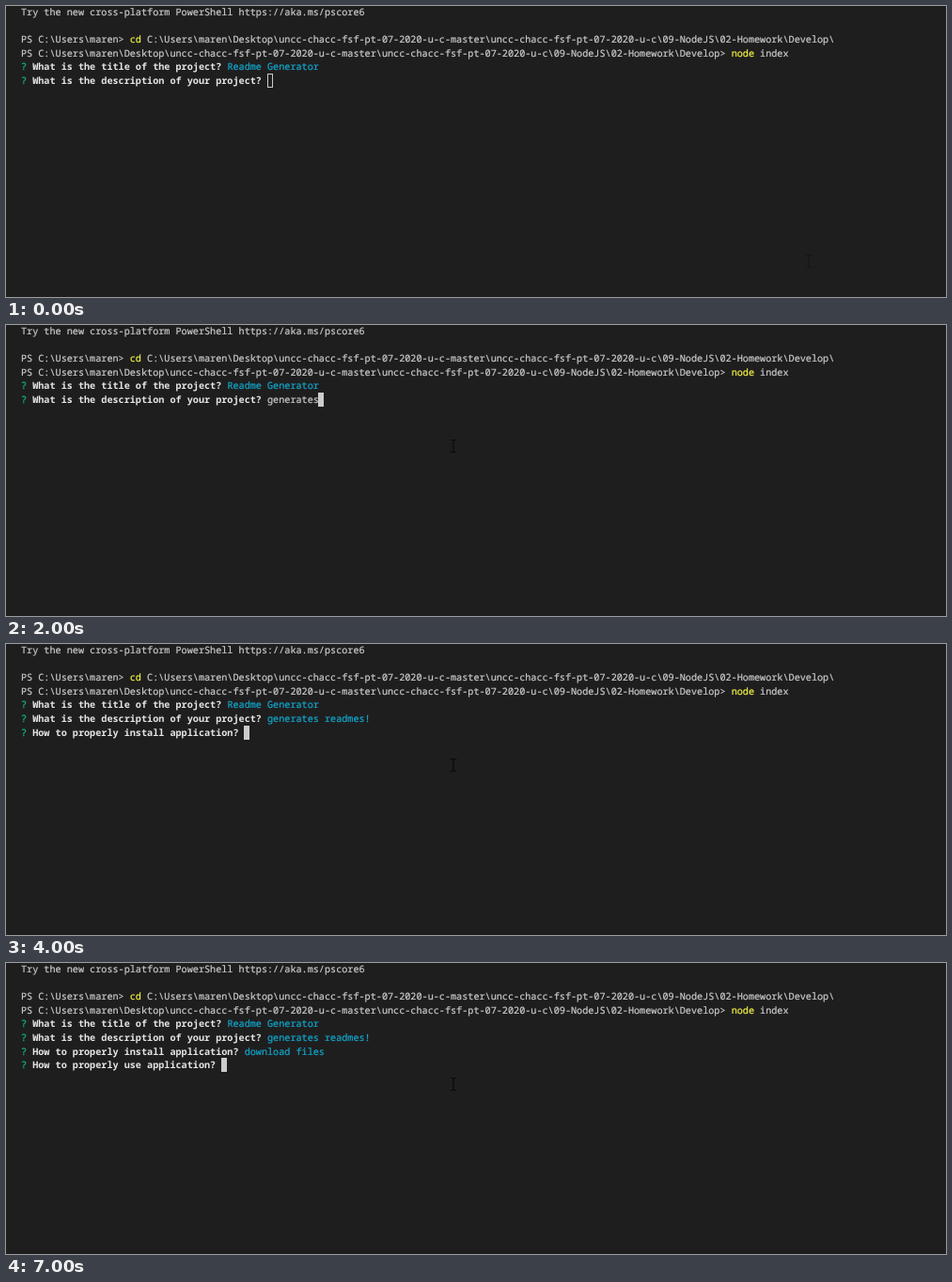
Animation, 1000 px wide and 310 px high, one loop 7100 ms. Source, as an HTML page:

```html
<!DOCTYPE html>
<html lang="en">
<head>
<meta charset="utf-8">
<title>Readme generator in a terminal</title>
<style>
  html, body { margin: 0; width: 100%; height: 100%; overflow: hidden; background: #1f1e1f; }
  svg { display: block; width: 1000px; height: 310px; }
  text {
    font: 10.16px "Noto Sans Mono", "DejaVu Sans Mono", monospace;
    color: #ccc; fill: currentColor; stroke: currentColor; stroke-width: 0.2px;
    white-space: pre; text-rendering: geometricPrecision;
  }
  tspan { fill: currentColor; stroke: currentColor; }
  .cmd { color: #f5f543; }
  .mark { color: #0dbc79; }
  .ask { color: #e5e5e5; font-weight: bold; stroke: none; }
  .done { color: #11a8cd; }
</style>
</head>
<body>
<svg id="stage" viewBox="0 0 1000 310" xmlns="http://www.w3.org/2000/svg">
  <rect width="1000" height="310" fill="#1f1e1f"/>
  <text x="16" y="10">Try the new cross-platform PowerShell https://aka.ms/pscore6</text>
  <text x="16" y="39">PS C:\Users\maren> <tspan class="cmd">cd</tspan> C:\Users\maren\Desktop\uncc-chacc-fsf-pt-07-2020-u-c-master\uncc-chacc-fsf-pt-07-2020-u-c\09-NodeJS\02-Homework\Develop\</text>
  <text x="16" y="54">PS C:\Users\maren\Desktop\uncc-chacc-fsf-pt-07-2020-u-c-master\uncc-chacc-fsf-pt-07-2020-u-c\09-NodeJS\02-Homework\Develop> <tspan class="cmd">node</tspan> index</text>
  <g id="prompts"></g>
  <rect id="caret" width="5" height="14" stroke="#ccc"/>
  <path id="mouse" d="M-3.5-6.5H-1L0-5.5L1-6.5H3.5M0-5.5V5.5M-3.5 6.5H-1L0 5.5L1 6.5H3.5" fill="none" stroke="#0a0a0a" stroke-width="1.1"/>
</svg>
<script>
const LOOP = 7100, STEP = 100;
const LEFT = 16, CELL = 6.096, ROW = 14.65, BASE = 9.6;
const FOCUS = 1100;

// show: prompt appears, enter: answer submitted, keys: [time, characters typed]
const prompts = [
  { ask: "What is the title of the project?", answer: "Readme Generator",
    show: -1, enter: -1, keys: [[-1, 16]] },
  { ask: "What is the description of your project?", answer: "generates readmes!",
    show: -1, enter: 3600,
    keys: [[1400, 0], [1500, 2], [1600, 4], [1900, 7], [2000, 9], [2200, 10], [2500, 13], [2900, 17], [3200, 17], [3300, 18]] },
  { ask: "How to properly install application?", answer: "download files",
    show: 3600, enter: 6400, keys: [[5400, 0], [6000, 13], [6200, 14]] },
  { ask: "How to properly use application?", answer: "",
    show: 6400, enter: LOOP, keys: [[0, 0]] }
];

const mouseX = [[0, 854], [200, 585], [300, 475], [400, 371], [500, 289], [600, 300], [800, 440], [900, 476]];
const mouseY = [[0, 272], [200, 190], [300, 163], [400, 122], [500, 100], [600, 102], [800, 124], [900, 129]];

const $ = id => document.getElementById(id);
const baseline = row => Math.round(BASE + ROW * row);

function along(points, t) {
  if (t <= points[0][0]) return points[0][1];
  for (let i = 1; i < points.length; i++) {
    const [t0, v0] = points[i - 1], [t1, v1] = points[i];
    if (t <= t1) return v0 + (v1 - v0) * (t - t0) / (t1 - t0);
  }
  return points[points.length - 1][1];
}

function add(parent, tag, cls, text) {
  const el = document.createElementNS("http://www.w3.org/2000/svg", tag);
  if (cls) el.setAttribute("class", cls);
  if (text) el.textContent = text;
  return parent.appendChild(el);
}

function set(el, attrs) {
  for (const name in attrs) el.setAttribute(name, attrs[name]);
}

prompts.forEach((p, i) => {
  p.y = baseline(4 + i);
  p.line = add($("prompts"), "text");
  set(p.line, { x: LEFT, y: p.y });
  add(p.line, "tspan", "mark", "? ");
  add(p.line, "tspan", "ask", p.ask + " ");
  p.input = add(p.line, "tspan");
});

function draw(t) {
  for (const p of prompts) {
    const count = Math.floor(along(p.keys, t) + 1e-6);
    p.line.setAttribute("visibility", t >= p.show ? "visible" : "hidden");
    p.input.textContent = p.answer.slice(0, count);
    p.input.setAttribute("class", t >= p.enter ? "done" : "");
    if (t >= p.show && t < p.enter) {
      set($("caret"), {
        x: Math.floor(LEFT + CELL * (p.ask.length + 3 + count)) + 0.5,
        y: p.y - 10.5,
        fill: t >= FOCUS ? "#ccc" : "none"
      });
    }
  }
  set($("mouse"), {
    transform: `translate(${along(mouseX, t)} ${along(mouseY, t)})`,
    opacity: t < 200 ? 0.4 : 1
  });
}

const start = performance.now();
function tick() {
  const t = (performance.now() - start) % LOOP;
  draw(Math.floor(t / STEP) * STEP);
  requestAnimationFrame(tick);
}
draw(0);
requestAnimationFrame(tick);
</script>
</body>
</html>
```
